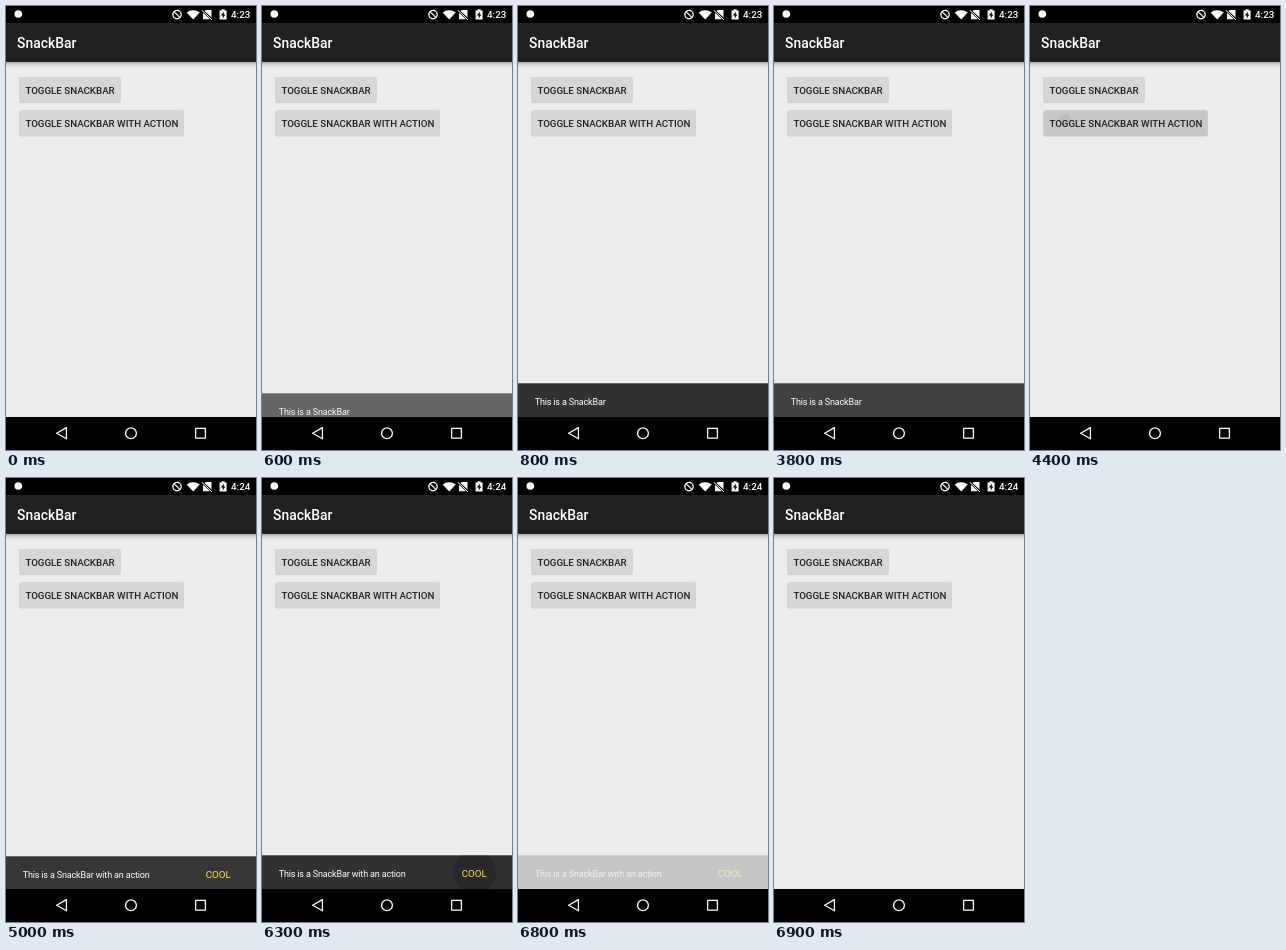
An HTML page for the animation above (7 s loop, 250 by 444 pixels).

```html
<!DOCTYPE html>
<html lang="en">
<head>
<meta charset="utf-8">
<title>SnackBar</title>
<style>
html, body { margin: 0; width: 100%; height: 100%; overflow: hidden; background: #000; }
svg { display: block; width: 250px; height: 444px; }
text { font: 500 9.72px Roboto, sans-serif; fill: #212121; }
.clock { font-size: 9.8px; fill: #fff; }
.title { font-size: 13.9px; fill: #fff; }
.message { font-weight: 400; font-size: 9px; letter-spacing: -.15px; fill: #fff; }
.action { font-weight: 400; fill: #ffeb3b; }
.button { fill: #d6d6d6; filter: drop-shadow(0 .7px .6px rgba(0, 0, 0, .22)); }
.line { fill: none; stroke: #fff; stroke-width: 1.3; }
.snack, .ripple, #late { opacity: 0; }
.ripple { transform-box: fill-box; transform-origin: center; }
</style>
</head>
<body>
<svg viewBox="0 0 250 444">
  <defs>
    <linearGradient id="shade" x2="0" y2="1">
      <stop stop-color="#000" stop-opacity=".3"/>
      <stop offset=".45" stop-color="#000" stop-opacity=".1"/>
      <stop offset="1" stop-color="#000" stop-opacity="0"/>
    </linearGradient>
    <clipPath id="barArea"><rect y="377.3" width="250" height="34"/></clipPath>
  </defs>

  <rect y="17" width="250" height="394" fill="#ececec"/>
  <rect y="56" width="250" height="6" fill="url(#shade)"/>
  <rect y="17" width="250" height="39" fill="#212121"/>
  <text class="title" x="11.1" y="42">SnackBar</text>

  <rect class="button" id="plain" x="13.5" y="71.2" width="101" height="25.6" rx="1.4"/>
  <circle class="ripple" id="plainRipple" cx="40" cy="84" r="6"/>
  <text x="19.4" y="87.6">TOGGLE SNACKBAR</text>
  <rect class="button" id="withAction" x="13.5" y="104.6" width="164" height="25.6" rx="1.4"/>
  <circle class="ripple" id="actionRipple" cx="35.3" cy="114" r="6"/>
  <text x="19.4" y="121">TOGGLE SNACKBAR WITH ACTION</text>

  <g class="snack" id="first">
    <rect y="377.3" width="250" height="34" fill="#323232"/>
    <text class="message" x="16.7" y="399.2">This is a SnackBar</text>
  </g>
  <g class="snack" id="second">
    <rect y="377.3" width="250" height="34" fill="#323232"/>
    <g clip-path="url(#barArea)"><circle class="ripple" id="coolRipple" cx="212.5" cy="394.5" r="21.5"/></g>
    <text class="message" x="16.7" y="399.2">This is a SnackBar with an action</text>
    <text class="action" x="199.8" y="399.2">COOL</text>
  </g>

  <rect width="250" height="17" fill="#000"/>
  <circle cx="12.3" cy="8" r="3.8" fill="#fff"/>
  <g class="line" stroke-width="1.1">
    <circle cx="171" cy="8.6" r="4.2"/>
    <path d="M168 5.6l6 6"/>
  </g>
  <path d="M180.6 6.6Q187.2 1.8 193.8 6.6L187.2 13.6z" fill="#fff"/>
  <path d="M199.5 4H205.5V13.2H197V6.5z" fill="#fff"/>
  <path d="M195.6 3.8L206.6 14.2" stroke="#000" stroke-width="2.4"/>
  <path d="M196 4.4L206 14" stroke="#fff" stroke-width="1"/>
  <path d="M213.6 4.4H215.6V3.2H218.6V4.4H220.6V13.6H213.6z" fill="#fff"/>
  <path d="M217.7 5.6L215 9.6H216.8V12.4L219.3 8.4H217.7z" fill="#000"/>
  <text class="clock" id="early" x="225" y="12.4">4:23</text>
  <text class="clock" id="late" x="225" y="12.4">4:24</text>

  <rect y="411" width="250" height="33" fill="#000"/>
  <g class="line">
    <path d="M60.4 421.6V432.8L50.6 427.2z" stroke-linejoin="round"/>
    <circle cx="125" cy="427.3" r="5.4"/>
    <rect x="189.6" y="422.4" width="9.8" height="9.8" rx=".4"/>
  </g>
</svg>
<script>
const LOOP = 7000, STEP = 100, BAR = 34;

// Each step is [time in ms, styles], held until the next one.
function play(id, steps) {
  const frames = steps.map(([time, style]) => ({ ...style, offset: time / LOOP, easing: "step-end" }));
  frames.push({ ...steps[steps.length - 1][1], offset: 1 });
  document.getElementById(id).animate(frames, { duration: LOOP, iterations: Infinity });
}

const snack = (shown, slide = 0) => ({ opacity: shown, transform: `translateY(${slide}px)` });
const ripple = (opacity, scale) => ({ opacity, transform: `scale(${scale})` });
const ease = p => .5 - .5 * Math.cos(Math.PI * p);

function showSnack(id, enter, leave, fade) {
  const steps = [[0, snack(0, BAR)]];
  [.25, .72, .98, 1].forEach((p, i) => steps.push([enter + i * STEP, snack(p, Math.round((1 - p) * BAR))]));
  fade.forEach((alpha, i) => steps.push([leave + i * STEP, snack(alpha)]));
  play(id, steps);
}

function press(id, rippleId, down, up) {
  play(id, [
    [0, { fill: "#d6d6d6" }],
    [down, { fill: "#cecece" }],
    [Math.min(down + STEP, up), { fill: "#c8c8c8" }],
    [up + STEP, { fill: "#d6d6d6" }]
  ]);
  play(rippleId, [
    [0, ripple(0, .5)],
    [down, ripple(.05, .7)],
    [down + STEP, ripple(.06, 1)],
    [up + STEP, ripple(0, 1)]
  ]);
}

press("plain", "plainRipple", 400, 500);
press("withAction", "actionRipple", 4300, 4700);
showSnack("first", 500, 3800, [.92, .45, 0]);
showSnack("second", 4800, 6600, [.92, .6, .2, 0]);

const grow = Array.from({ length: 8 }, (_, i) =>
  [5600 + i * STEP, ripple(.08 + .1 * i / 7, .3 + .7 * ease((i + 1) / 8))]);
play("coolRipple", [[0, ripple(0, .3)], ...grow, [6400, ripple(.15, 1)], [6600, ripple(.06, 1)], [6700, ripple(0, 1)]]);

play("early", [[0, { opacity: 1 }], [4800, { opacity: 0 }]]);
play("late", [[0, { opacity: 0 }], [4800, { opacity: 1 }]]);
</script>
</body>
</html>
```
